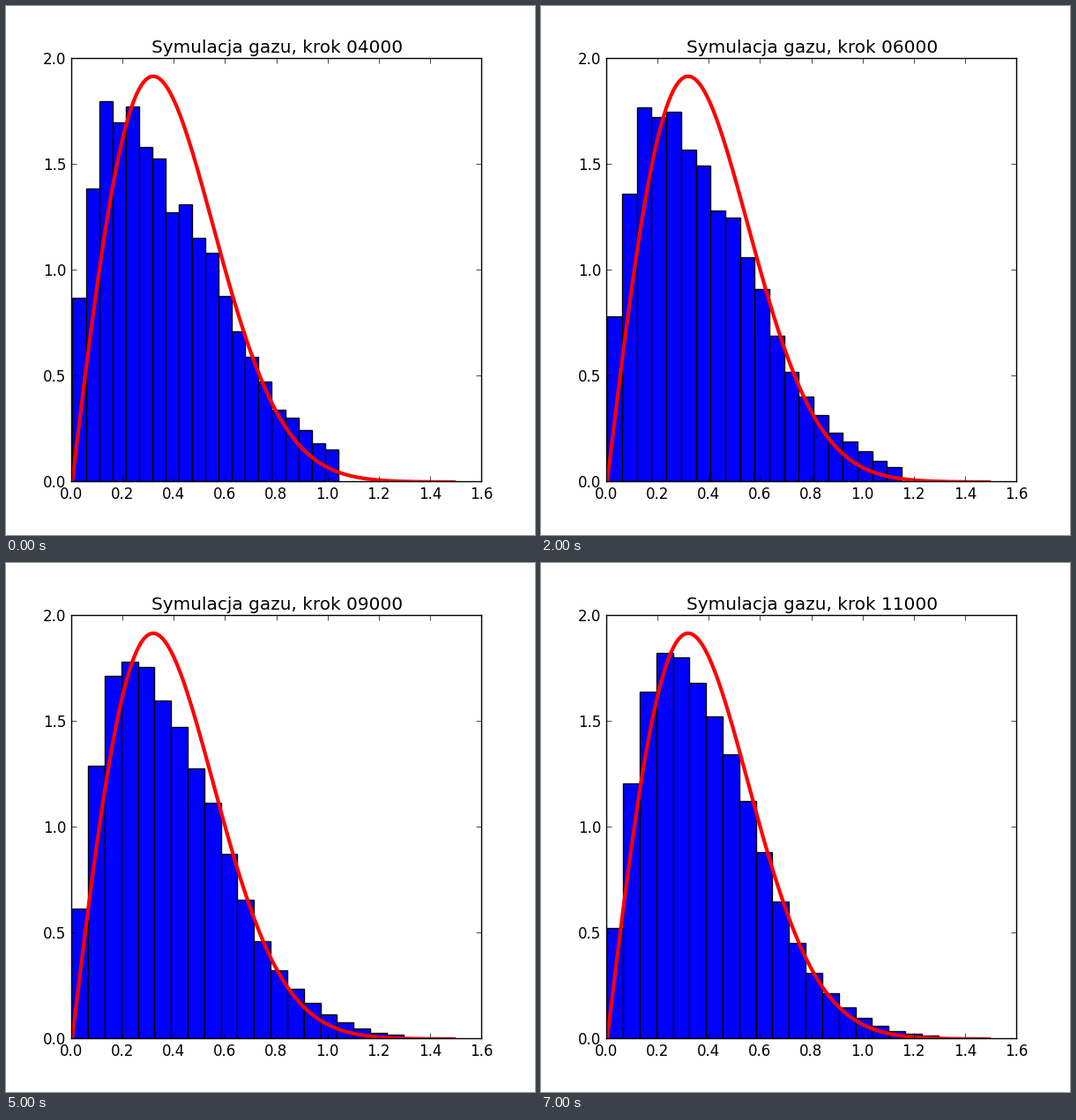
These frames come from a looping animation (600x600 px, 8 s). A matplotlib script:

```python
import numpy as np
import matplotlib.pyplot as plt
from matplotlib.animation import FuncAnimation
from matplotlib.transforms import ScaledTranslation

SIZE, DPI = 600, 100
BINS = 20
FIRST, LAST = 4000, 11000

plt.rcParams.update({
    "font.family": "DejaVu Sans",
    "font.size": 12,
    "text.kerning_factor": 0,
    "axes.axisbelow": False,
    "axes.linewidth": 1.0,
    "lines.solid_capstyle": "projecting",
})

jitter = np.random.default_rng(4).uniform(-1, 1, BINS)


def histogram(step):
    """Bin edges and densities of a gas relaxing towards equilibrium."""
    t = (step - FIRST) / (LAST - FIRST)
    slowest = np.interp(step, [6000, 9000], [0.005, 0.001])
    fastest = np.interp(step, [4000, 5000, 6000, 7000],
                        [1.042, 1.086, 1.153, 1.296])
    edges = np.linspace(slowest, fastest, BINS + 1)
    speed = (edges[:-1] + edges[1:]) / 2

    # Weibull density whose shape drifts towards the Maxwell curve
    shape, scale = 1.55 + 0.25 * t, 0.437
    x = speed / scale
    density = shape / scale * x ** (shape - 1) * np.exp(-x ** shape)

    # Unevenness that settles with time
    ripple = (0.07 - 0.03 * t) * np.cos(2 * np.pi * (speed - 0.14) / 0.45)
    return edges, density * (1 + ripple + 0.07 * (1 - t) * jitter)


fig = plt.figure(figsize=(SIZE / DPI, SIZE / DPI), dpi=DPI, facecolor="white")
ax = fig.add_axes([74 / SIZE, 61 / SIZE, 465 / SIZE, 480 / SIZE])
ax.set_xticks(np.arange(9) * 0.2, [f"{0.2 * i:.1f}" for i in range(9)])
ax.set_yticks(np.arange(5) * 0.5, [f"{0.5 * i:.1f}" for i in range(5)])
ax.tick_params(direction="in", top=True, right=True, length=4, width=0.5, pad=4)
title = fig.text(307.25 / SIZE, 547 / SIZE, "", fontsize=14.4, ha="center")

bars = ax.bar(np.zeros(BINS), np.zeros(BINS), align="edge",
              facecolor="#0000ff", edgecolor="black", linewidth=1)

# Two-dimensional Maxwell distribution with kT/m = 0.1;
# one pixel of offset, as the curve is not snapped like the axes and bars
nudge = ScaledTranslation(1 / DPI, -1 / DPI, fig.dpi_scale_trans)
v = np.arange(0, 1.5, 0.01)
ax.plot(v, 10 * v * np.exp(-5 * v**2), color="#ff0000", linewidth=3,
        transform=ax.transData + nudge)
ax.set(xlim=(0, 1.6), ylim=(0, 2))


def draw(frame):
    step = FIRST + 1000 * frame
    edges, heights = histogram(step)
    for bar, left, right, height in zip(bars, edges, edges[1:], heights):
        bar.set_bounds(left, 0, right - left, height)
    title.set_text(f"Symulacja gazu, krok {step:05d}")
    return [*bars, title]


anim = FuncAnimation(fig, draw, frames=8, interval=1000, repeat=True,
                     repeat_delay=0, blit=False)
plt.show()
```
